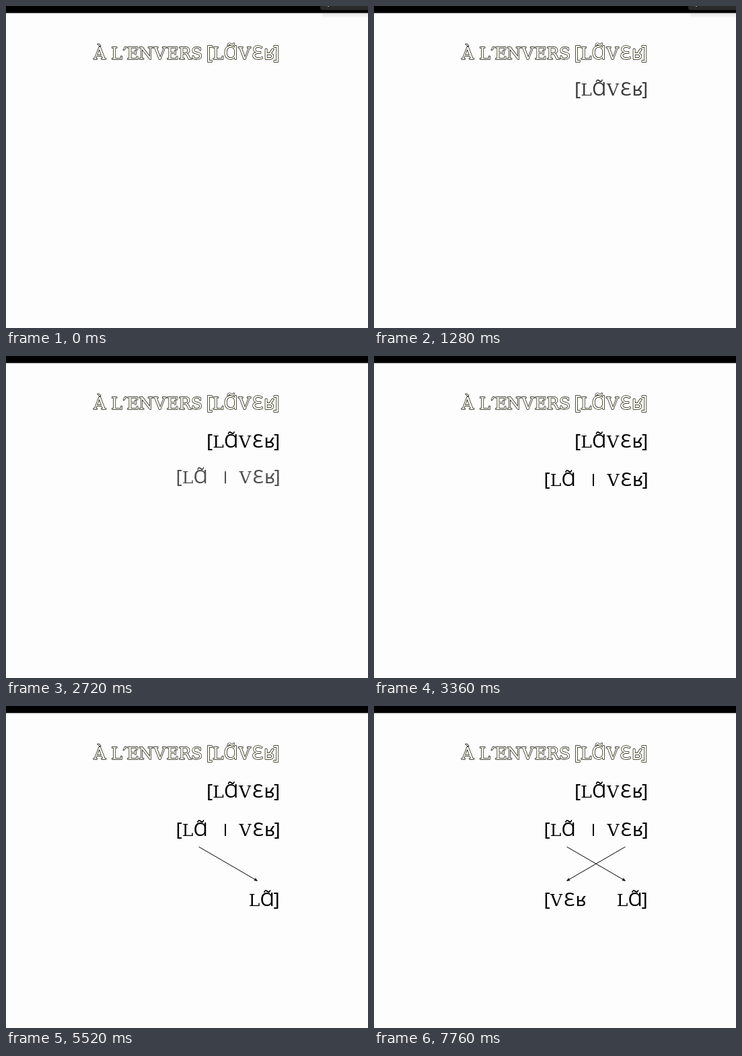
Recreate the animation shown at these times as an HTML page with a canvas. Size 538x478 px, loop 8000 ms.

```html
<!DOCTYPE html>
<html lang="fr">
<head>
<meta charset="utf-8">
<title>À l’envers</title>
<style>
html, body { margin: 0; width: 100%; height: 100%; overflow: hidden; background: #fdfdfd; }
canvas { display: block; width: 538px; height: 478px; }
</style>
</head>
<body>
<canvas id="stage" width="538" height="478"></canvas>
<script>
const ctx = document.getElementById('stage').getContext('2d');
const LOOP = 8000, STEP = 80;
const SERIF = '25px "DejaVu Serif", serif';
const SANS = '28px "Noto Sans", "DejaVu Sans", sans-serif';

// Letter pitch of the loosely tracked capitals
const pitch = {
  '[': 8, ']': 7, ' ': 6.5, '′': 6, 'À': 19.5, L: 18, E: 18, N: 21,
  V: 20, R: 19, S: 16, 'Ɑ': 20.5, 'Ɛ': 18.5, 'ʁ': 15.5
};

const clamp = v => Math.max(0, Math.min(1, v));

function glyph(ch, x, y, outlined) {
  if (outlined) {
    ctx.strokeStyle = '#111';
    ctx.lineWidth = 1.4;
    ctx.lineJoin = 'round';
    ctx.strokeText(ch, x, y);
  }
  ctx.fillStyle = outlined ? '#fffdea' : '#000';
  ctx.fillText(ch, x, y);
}

function write(text, x, y, outlined = false) {
  ctx.textAlign = 'center';
  for (const ch of text) {
    const mid = x + pitch[ch] / 2;
    ctx.font = '[ⱭƐʁ]'.includes(ch) ? SANS : SERIF;
    glyph(ch, mid, y, outlined);
    if (ch === 'Ɑ') glyph('˜', mid, y - 3.5, outlined);
    x += pitch[ch];
  }
}

// Fades in while settling downwards
function floatIn(t, start, draw) {
  if (t < start) return;
  const p = Math.sin(clamp((t - start + 40) / 1080) * Math.PI / 2);
  ctx.save();
  ctx.globalAlpha = p;
  ctx.translate(0, -12 * (1 - p));
  draw();
  ctx.restore();
}

function arrow(t, start, x0, x1) {
  const p = clamp((t - start) / 560);
  if (!p) return;
  const y0 = 209, y1 = 259.5;
  ctx.save();
  ctx.beginPath();
  ctx.rect(250, 207, 160, 54 * p);
  ctx.clip();
  ctx.strokeStyle = ctx.fillStyle = '#000';
  ctx.lineWidth = 1;
  ctx.beginPath();
  ctx.moveTo(x0, y0);
  ctx.lineTo(x1, y1);
  ctx.stroke();
  ctx.translate(x1, y1);
  ctx.rotate(Math.atan2(y1 - y0, x1 - x0));
  ctx.beginPath();
  ctx.moveTo(0.5, 0);
  ctx.lineTo(-4.5, -2.4);
  ctx.lineTo(-4.5, 2.4);
  ctx.fill();
  ctx.restore();
}

function topBar(t) {
  ctx.fillStyle = '#000';
  ctx.fillRect(0, 0, 538, 10);
  ctx.fillStyle = 'rgba(0,0,0,0.5)';
  ctx.fillRect(0, 10, 538, 1);
  const a = 1 - clamp((t - 1520) / 320);
  if (!a) return;
  ctx.save();
  ctx.globalAlpha = a;
  const shade = ctx.createLinearGradient(0, 11, 0, 18);
  shade.addColorStop(0, 'rgba(0,0,0,0.09)');
  shade.addColorStop(1, 'rgba(0,0,0,0)');
  ctx.fillStyle = shade;
  ctx.fillRect(470, 11, 68, 7);
  ctx.fillStyle = '#2b2b2b';
  ctx.beginPath();
  ctx.roundRect(467, -10, 80, 16, 4);
  ctx.fill();
  ctx.fillStyle = '#aaa';
  ctx.fillRect(478, 0, 2, 1);
  ctx.restore();
}

function render(t) {
  ctx.fillStyle = '#fdfdfd';
  ctx.fillRect(0, 0, 538, 478);
  topBar(t);
  write('À L′ENVERS [LⱭVƐʁ]', 129.5, 79, true);
  floatIn(t, 720, () => write('[LⱭVƐʁ]', 298.5, 136));
  floatIn(t, 2240, () => {
    write('[LⱭ', 253, 193);
    ctx.fillRect(325, 175, 2, 18);
    write('VƐʁ]', 345.5, 193);
  });
  arrow(t, 3520, 286.5, 373.5);
  floatIn(t, 4480, () => write('LⱭ]', 360, 297));
  arrow(t, 5680, 373.5, 286.5);
  floatIn(t, 6640, () => write('[VƐʁ', 253, 297));
}

const origin = performance.now();
function tick() {
  const t = (performance.now() - origin) % LOOP;
  render(Math.floor(t / STEP) * STEP);
  requestAnimationFrame(tick);
}
tick();
</script>
</body>
</html>
```
